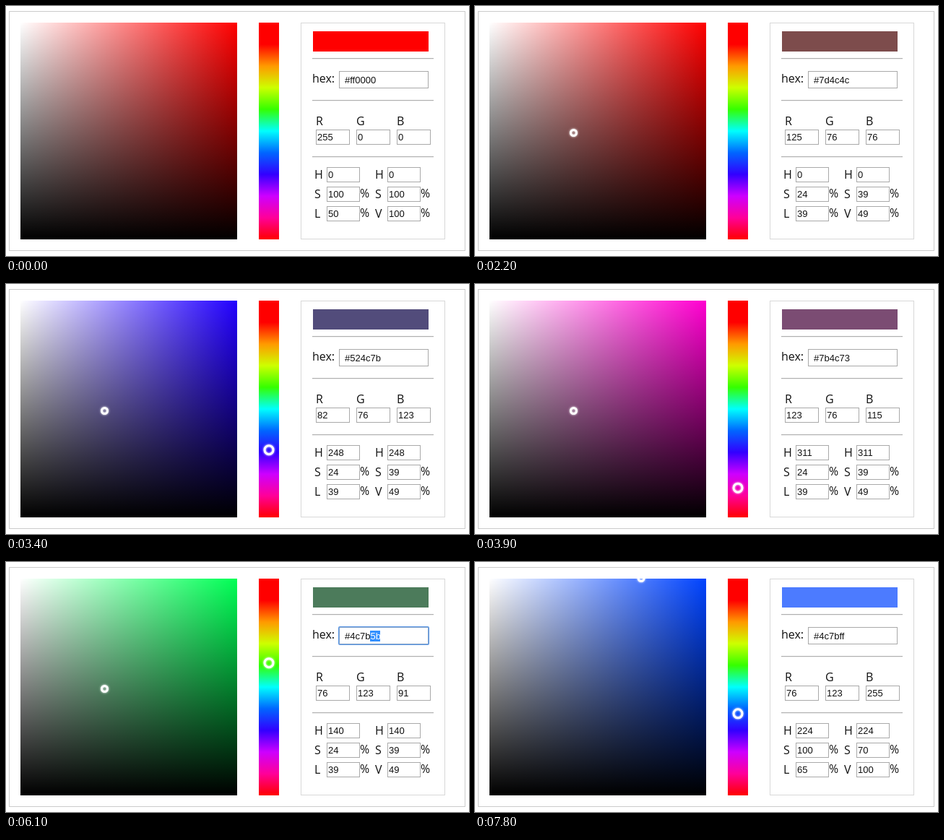
An HTML page for the animation above (8000 ms loop, 641x346 px).

```html
<!DOCTYPE html>
<html lang="en">
<head>
<meta charset="utf-8">
<title>Color picker</title>
<style>
html, body { margin: 0; width: 100%; height: 100%; overflow: hidden; background: #fff; }
svg { display: block; width: 641px; height: 346px; }
.label { font: 16px "Open Sans", "Noto Sans", sans-serif; fill: #111; }
.value { font: 13px "Liberation Sans", Arial, sans-serif; fill: #111; }
.box { fill: #fff; stroke: #a9a9a9; }
.ring { fill: none; stroke: #fff; stroke-width: 3; }
</style>
</head>
<body>
<svg id="stage" viewBox="0 0 641 346" xmlns="http://www.w3.org/2000/svg">
  <defs>
    <linearGradient id="white"><stop stop-color="#fff"/><stop offset="1" stop-color="#fff" stop-opacity="0"/></linearGradient>
    <linearGradient id="black" x2="0" y2="1"><stop stop-opacity="0"/><stop offset="1"/></linearGradient>
    <linearGradient id="rainbow" x2="0" y2="1"></linearGradient>
    <clipPath id="area"><rect x="20" y="23" width="300" height="300"/></clipPath>
    <filter id="glow" x="-1" y="-1" width="3" height="3"><feGaussianBlur stdDeviation="1.5"/></filter>
  </defs>
  <rect x="4.5" y="7.5" width="631" height="331" fill="none" stroke="#ccc"/>
  <rect id="field" x="20" y="23" width="300" height="300"/>
  <rect x="20" y="23" width="300" height="300" fill="url(#white)"/>
  <rect x="20" y="23" width="300" height="300" fill="url(#black)"/>
  <rect x="350" y="23" width="28" height="300" fill="url(#rainbow)"/>
  <rect x="408.5" y="23.5" width="199" height="299" fill="none" stroke="#d8d8d8"/>
  <rect id="swatch" x="425" y="35" width="160" height="28"/>
  <g clip-path="url(#area)"><g id="picker">
    <circle class="ring" r="4" filter="url(#glow)"/><circle class="ring" r="4"/>
  </g></g>
  <g id="thumb">
    <circle class="ring" r="6" filter="url(#glow)"/><circle class="ring" r="6"/>
  </g>
  <g id="panel"></g>
</svg>
<script>
const LOOP = 8000;
const $ = id => document.getElementById(id);
const panel = $("panel");

function add(parent, tag, attrs, text = "") {
  const el = document.createElementNS("http://www.w3.org/2000/svg", tag);
  for (const k in attrs) el.setAttribute(k, attrs[k]);
  el.textContent = text;
  return parent.appendChild(el);
}
const show = (el, on) => el.setAttribute("visibility", on ? "visible" : "hidden");
const move = (el, x, y) => el.setAttribute("transform", `translate(${x} ${y})`);
const label = (x, y, text) => add(panel, "text", { class: "label", x, y }, text);

function input(x, y, width, height) {
  return add(panel, "rect", { class: "box", x: x + .5, y: y + .5, width, height });
}
function numberInput(x, y, width) {
  input(x, y, width, 20);
  return add(panel, "text", { class: "value", x: x + 2, y: y + 15 });
}
function spinner(x, y) {
  return add(panel, "path", {
    d: `M${x} ${y + 4}l3.5-4l3.5 4zM${x} ${y + 6}h7l-3.5 4z`, fill: "#505050"
  });
}

["f00", "f00", "f90", "cdff00", "35ff00", "00fffd", "06f", "3200ff", "cd00ff", "f09", "f00"]
  .forEach((c, i) => add($("rainbow"), "stop", { offset: i / 10, "stop-color": "#" + c }));

for (const y of [72, 130, 208]) {
  add(panel, "rect", { x: 424, y, width: 168, height: 1, fill: "#b0b0b0" });
  add(panel, "rect", { x: 424, y: y + 1, width: 168, height: 1, fill: "#eee" });
}

label(424, 106, "hex:");
input(461, 90, 123, 23);
const focus = add(panel, "rect", {
  x: 460.75, y: 89.75, width: 124.5, height: 24.5, rx: 1.5,
  fill: "none", stroke: "#5f9ae6", "stroke-width": 1.6
});
const selection = add(panel, "rect", { y: 95, height: 15, fill: "#3390ff" });
const hexText = add(panel, "text", { class: "value", x: 469, y: 107 });
const hexHead = add(hexText, "tspan", {});
const hexTail = add(hexText, "tspan", { fill: "#fff" });
const caret = add(panel, "rect", { y: 95, width: 1, height: 15, fill: "#000" });

const rgbFields = [..."RGB"].map((name, i) => {
  label(429 + 56 * i, 165, name);
  return numberInput(429 + 56 * i, 171, 46);
});
const column = (x, names) => [...names].map((name, i) => {
  label(x, 239 + 27 * i, name);
  if (i) label(x + 63, 238 + 27 * i, "%");
  return numberInput(x + 17, 223 + 27 * i, 45);
});
const hslFields = column(427, "HSL");
const hsvFields = column(511, "HSV");
const hueSpinner = spinner(477, 228);
const redSpinner = spinner(463, 176);

// start time, hue, saturation, value
const steps = [
  [0, 0, 1, 1],
  [1200, 0, .52, .68],
  [1600, 0, .6, .6],
  [1900, 0, .66, .52],
  [2200, 0, .39, .49],
  [2700, 190, .39, .49],
  [3400, 248, .39, .49],
  [3600, 290, .39, .49],
  [3900, 311, .39, .49],
  [4200, 215, .39, .49],
  [4500, 140, .39, .49],
  [7800, 224.2, .702, 1]
];

function toRgb(h, light, amp) {
  return [0, 8, 4].map(n => {
    const k = (n + h / 30) % 12;
    return Math.round(255 * (light - amp * Math.max(-1, Math.min(k - 3, 9 - k, 1))));
  });
}
const toHex = rgb => "#" + rgb.map(c => c.toString(16).padStart(2, "0")).join("");
const fill = (fields, values) =>
  fields.forEach((f, i) => f.textContent = Math.round(values[i]));

function drawHex(t, hex) {
  const typing = t >= 7000 && t < 7800;
  const selected = t < 6000 || t >= 7000 ? 0 : t < 6100 ? 1 : 2;
  if (typing) hex = t < 7100 ? "#4c7bf" : "#4c7bff";
  const cut = hex.length - selected;
  hexHead.textContent = hex.slice(0, cut);
  hexTail.textContent = hex.slice(cut);
  show(focus, t >= 6000 && t < 7800);
  show(selection, selected > 0);
  selection.setAttribute("x", 518 - 7 * selected);
  selection.setAttribute("width", 7 * selected);
  show(caret, typing && t < 7600);
  caret.setAttribute("x", t < 7100 ? 508 : 512);
}

function draw(t) {
  const [start, h, s, v] = steps.findLast(step => step[0] <= t);
  // the hue slider keeps the rounded HSL saturation and lightness
  const sliding = start >= 2700 && start < 7800;
  const rgb = sliding ? toRgb(h, .39, .0936) : toRgb(h, v * (1 - s / 2), v * s / 2);
  const max = Math.max(...rgb), min = Math.min(...rgb), sum = max + min;
  const hex = toHex(rgb);

  $("field").setAttribute("fill", toHex(toRgb(h, .5, .5)));
  $("swatch").setAttribute("fill", hex);
  show($("picker"), start > 0);
  move($("picker"), 19.5 + 300 * s, 22.5 + 300 * (1 - v));
  show($("thumb"), start >= 2700);
  move($("thumb"), 364, 23 + h / 1.2);

  fill(rgbFields, rgb);
  fill(hslFields, [h, 100 * (max - min) / Math.min(sum, 510 - sum), sum / 5.1]);
  fill(hsvFields, [h, 100 * s, 100 * v]);
  drawHex(t, hex);
  show(hueSpinner, t >= 4700 && t < 4800);
  show(redSpinner, t >= 5100 && t < 5200);
}

const begin = performance.now();
function tick() {
  draw((performance.now() - begin) % LOOP);
  requestAnimationFrame(tick);
}
tick();
</script>
</body>
</html>
```
